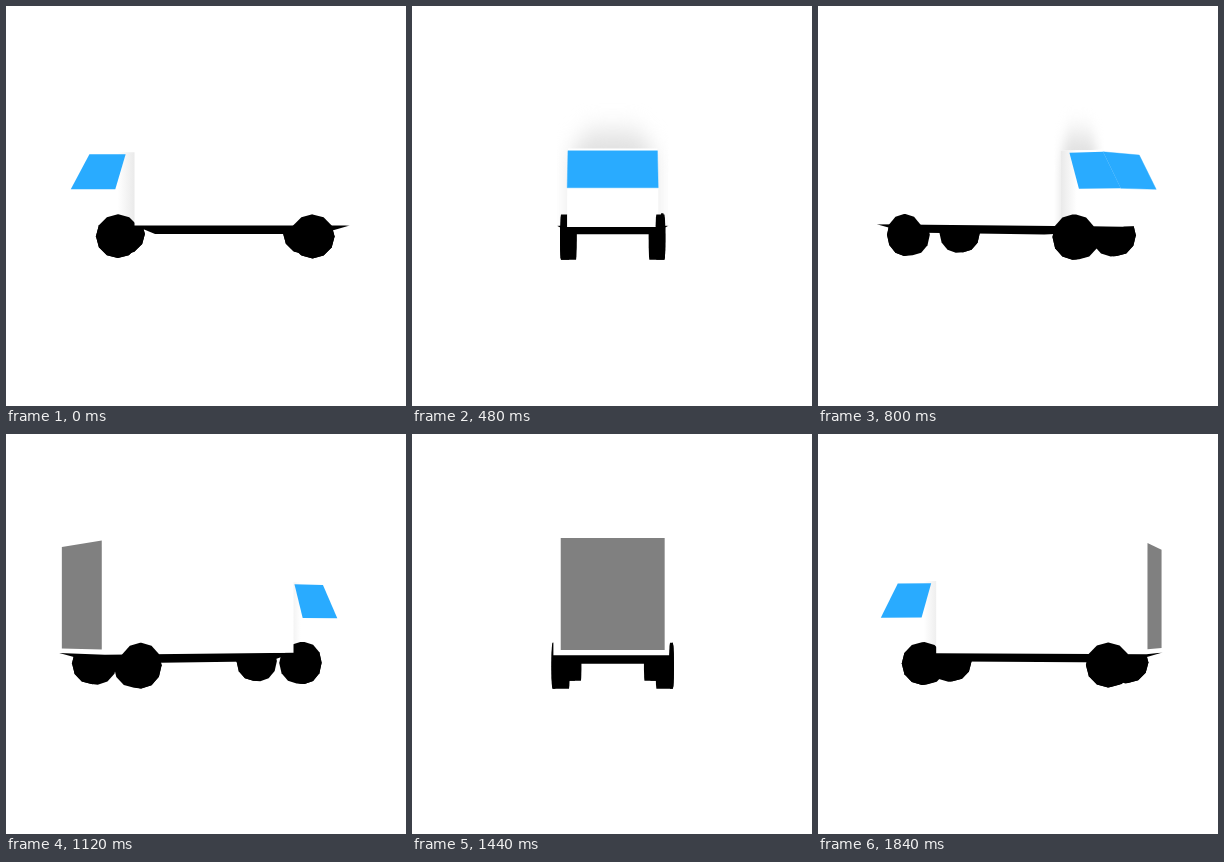
These frames come from a looping animation (400 by 400 pixels, 1920 ms). An HTML page:

```html
<!DOCTYPE html>
<html lang="en">
<head>
<meta charset="utf-8">
<title>Turning truck</title>
<style>
  html, body { margin: 0; width: 100%; height: 100%; overflow: hidden; background: #fff; }
  svg { display: block; width: 100vw; height: 100vh; }
</style>
</head>
<body>
<svg id="stage" viewBox="0 0 400 400"></svg>
<script>
const STEP_MS = 80, STEPS = 24, CAMERA = 1190;
const CENTRE = { x: 200.7, y: 200 };
const BLUE = '#29abff', GREY = '#808080';
const FLOOR = 18.7;                        // underside of cab and cargo box
const CARGO = { front: 69, rear: -136.7, half: 52.5, top: -97 };
const CAB_HALF = 40.5;
const WHEEL = { radius: 21, y: 29, sides: 12 };
const FRONT_WHEEL = { u: 85.3, inner: 34, outer: 48, body: CAB_HALF };
const REAR_WHEEL = { u: -101, inner: 40, outer: 55, body: CARGO.half };

const stage = document.getElementById('stage');
let sin = 0, cos = 1;

// u: forward, v: sideways, y: down; camera looks level at the origin
function project([u, v, y]) {
  const scale = CAMERA / (CAMERA - u * sin - v * cos);
  return [CENTRE.x + (v * sin - u * cos) * scale, CENTRE.y + y * scale];
}

const polygon = (points, fill, extra = '') =>
  `<polygon points="${points.map(p => p.map(n => n.toFixed(2))).join(' ')}" fill="${fill}" ${extra}/>`;

const cross = (o, a, b) => (a[0] - o[0]) * (b[1] - o[1]) - (a[1] - o[1]) * (b[0] - o[0]);

function halfHull(points) {
  const chain = [];
  for (const p of points) {
    while (chain.length > 1 && cross(chain.at(-2), chain.at(-1), p) <= 0) chain.pop();
    chain.push(p);
  }
  return chain.slice(0, -1);
}

// Silhouette of a convex solid
function solid(corners, fill) {
  const points = corners.map(project).sort((a, b) => a[0] - b[0] || a[1] - b[1]);
  return polygon([...halfHull(points), ...halfHull(points.reverse())], fill);
}

// Flat face, corners clockwise as seen from outside
function face(corners, fill, extra) {
  const p = corners.map(project);
  return cross(p[0], p[1], p[2]) > 0 ? polygon(p, fill, extra) : '';
}

const bothSides = (profile, half) =>
  profile.flatMap(([u, y]) => [[u, half, y], [u, -half, y]]);

const rect = (rear, front, half, y) => bothSides([[rear, y], [front, y]], half);

function wheel({ u, outer }, side, from) {
  const corners = [];
  for (let i = 0; i < WHEEL.sides; i++) {
    const a = i / WHEEL.sides * 2 * Math.PI;
    const x = u + WHEEL.radius * Math.sin(a), y = WHEEL.y - WHEEL.radius * Math.cos(a);
    corners.push([x, side * from, y], [x, side * outer, y]);
  }
  return solid(corners, '#000');
}

// Body with the parts of its wheels that stick out on either side
function axleGroup(type, body) {
  const near = cos >= 0 ? 1 : -1;
  return wheel(type, -near, type.body) + body + wheel(type, near, type.body);
}

function sideFace(profile, side, fill) {
  const corners = profile.map(([u, y]) => [u, side * CAB_HALF, y]);
  return face(side > 0 ? corners : corners.reverse(), fill);
}

function cab() {
  const profile = [[112, -52], [CARGO.front, -52], [CARGO.front, FLOOR], [134, FLOOR], [131.3, -16]];
  const pane = [[113.3, -50], [78.3, -50], [88.3, -16.2], [131.3, -16.2]];
  let out = solid(bothSides(profile, CAB_HALF), '#fff');
  for (const side of [1, -1]) {
    const x1 = project([CARGO.front, side * CAB_HALF, 0])[0];
    const x2 = project([86, side * CAB_HALF, 0])[0];
    const id = side > 0 ? 'shadeA' : 'shadeB';
    out += `<linearGradient id="${id}" gradientUnits="userSpaceOnUse" x1="${x1}" y1="0" x2="${x2}" y2="0">
      <stop stop-color="#e9e9e9"/><stop offset="1" stop-color="#fff"/></linearGradient>`;
    out += sideFace(profile, side, `url(#${id})`) + sideFace(pane, side, BLUE);
  }
  const [top, , , bottom] = pane;
  return out + face([[top[0], -CAB_HALF, top[1]], [top[0], CAB_HALF, top[1]],
    [bottom[0], CAB_HALF, bottom[1]], [bottom[0], -CAB_HALF, bottom[1]]],
    BLUE, `stroke="${BLUE}" stroke-width=".4"`);
}

const upright = (u, half, top, bottom) =>
  [[u, -half, top], [u, half, top], [u, half, bottom], [u, -half, bottom]];

// Soft shadow of the cab on the front wall of the cargo box
function wallShadow() {
  const { front, half, top } = CARGO;
  const blur = `${(9 * Math.abs(sin)).toFixed(2)} 13`;
  const outline = [[-40, -50], [-22, -70], [22, -70], [40, -50], [40, 50], [-40, 50]];
  return `<clipPath id="wall">${polygon(upright(front, half, top, FLOOR).map(project), '#000')}</clipPath>
    <filter id="soft" x="-100%" y="-100%" width="300%" height="300%" color-interpolation-filters="sRGB">
      <feGaussianBlur stdDeviation="${blur}"/></filter>
    <g clip-path="url(#wall)">${face(outline.map(([v, y]) => [front, v, y]), '#e0e0e0', 'filter="url(#soft)"')}</g>`;
}

function cargo() {
  const { front, rear, half, top } = CARGO;
  const door = upright(rear, 46, -85, 14.2).map(([u, v, y]) => [u, -v, y]);
  return solid([...rect(rear, front, half, top), ...rect(rear, front, half, FLOOR)], '#fff')
    + wallShadow() + face(door, GREY);
}

function draw(step) {
  const angle = step / STEPS * 2 * Math.PI;
  sin = Math.sin(angle);
  cos = Math.cos(angle);
  let out = '';
  for (const type of [FRONT_WHEEL, REAR_WHEEL])
    for (const side of [1, -1]) out += wheel(type, side, type.inner);
  out += solid([...rect(CARGO.rear, CARGO.front, CARGO.half, FLOOR), ...rect(-110, 50, 38, 27)], '#000');
  const groups = [axleGroup(FRONT_WHEEL, cab()), axleGroup(REAR_WHEEL, cargo())];
  if (step > 0 && step < STEPS / 2) groups.reverse();   // cab is nearer than the box
  stage.innerHTML = out + groups.join('');
}

let shown = -1;
const start = performance.now();
function tick() {
  const step = Math.floor((performance.now() - start) / STEP_MS) % STEPS;
  if (step !== shown) draw(shown = step);
  requestAnimationFrame(tick);
}
tick();
</script>
</body>
</html>
```
